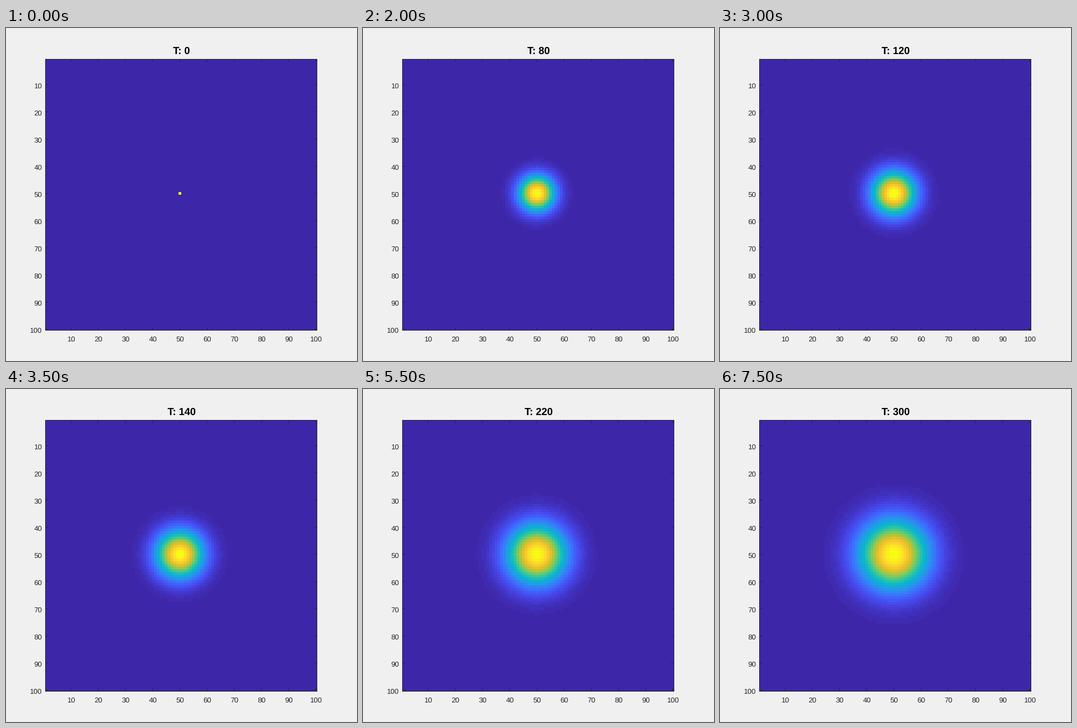
Write a matplotlib script that moves like this. It is 645 px wide and 613 px high and loops after 8 s.

```python
import numpy as np
import matplotlib.pyplot as plt
from matplotlib.animation import FuncAnimation
from matplotlib.colors import LinearSegmentedColormap
from matplotlib.patches import Rectangle

W, H, DPI = 645, 613, 64
LEFT, TOP, CELL, N = 72, 57, 5, 100
SIDE = CELL * N
RIGHT, BOTTOM = LEFT + SIDE, TOP + SIDE
TICK = 6
SPREAD = 4 / 15          # variance gained per time step
STEP, FRAMES = 20, 16
INK = (0.15, 0.15, 0.15)
PT = 72 / DPI            # points per pixel

plt.rcParams["font.family"] = "Liberation Sans"
plt.rcParams["text.hinting"] = "none"

# evenly spaced key colours, blue through teal to yellow, in 64 steps
cmap = LinearSegmentedColormap.from_list("heat", [
    "#3e26a8", "#4747eb", "#3e6fff", "#2797eb", "#08b5d0",
    "#31c69f", "#81cc59", "#dcbd29", "#fccf30", "#f9fb15"], N=64)

cells = np.arange(1, N + 1) - 50
r2 = cells[:, None] ** 2 + cells[None, :] ** 2


def heat(t):
    """Spread of a point source after t steps, scaled to a peak of one."""
    if t == 0:
        return (r2 == 0).astype(float)
    return np.exp(-r2 / (2 * SPREAD * t))


fig = plt.figure(figsize=(W / DPI, H / DPI), dpi=DPI, facecolor="#f0f0f0")
ax = fig.add_axes([0, 0, 1, 1])
ax.axis("off")
image = ax.imshow(heat(0), cmap=cmap, vmin=0, vmax=1, interpolation="nearest",
                  extent=(LEFT, RIGHT, BOTTOM, TOP), aspect="auto")
ax.set_xlim(0, W)
ax.set_ylim(H, 0)


def bar(x, y, w, h):
    ax.add_patch(Rectangle((x, y), w, h, color=INK, lw=0, antialiased=False, zorder=3))


def label(x, y, s, ha):
    ax.text(x, y, s, ha=ha, va="baseline", color=INK, fontsize=40 / 3 * PT)


for y in (TOP, BOTTOM - 1):
    bar(LEFT, y, SIDE, 1)
for x in (LEFT, RIGHT - 1):
    bar(x, TOP, 1, SIDE)

for v in range(10, N + 1, 10):
    d = int((v - 0.5) * CELL)
    for y in (TOP, BOTTOM - TICK):
        bar(LEFT + d, y, 1, TICK)
    for x in (LEFT, RIGHT - TICK):
        bar(x, TOP + d, TICK, 1)
    label(LEFT + d + 1, 577, str(v), "center")
    label(66.5, TOP + d + 7, str(v), "right")

title = ax.text(322.5, 48, "T: 0", ha="center", va="baseline", color="black",
                weight="bold", fontsize=56 / 3 * PT)


def update(i):
    t = i * STEP
    image.set_data(heat(t))
    title.set_text(f"T: {t}")
    return image, title


anim = FuncAnimation(fig, update, frames=FRAMES, interval=500,
                     repeat=True, repeat_delay=0, blit=False)
plt.show()
```
